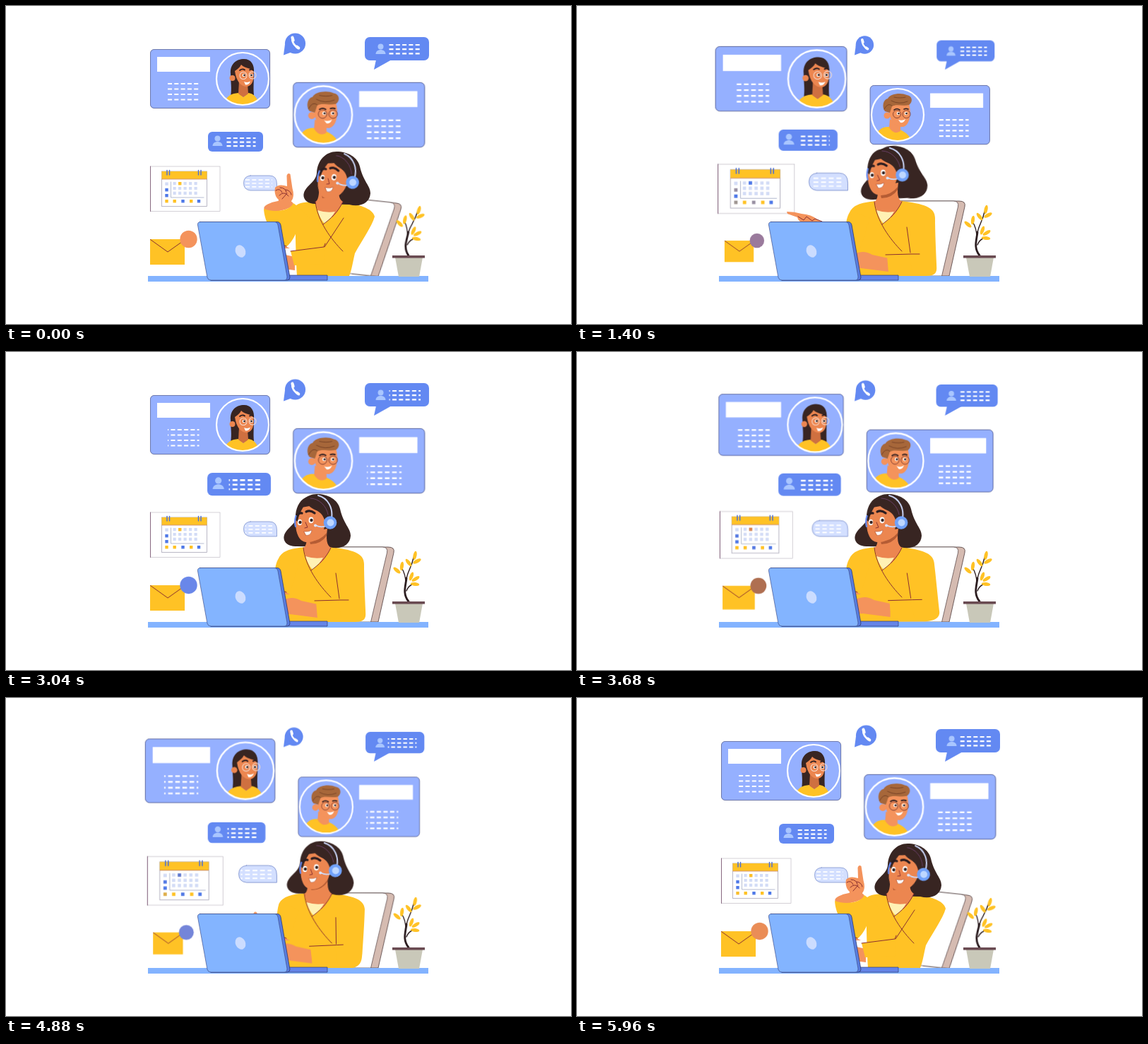
Recreate the animation shown at these times as an HTML page. Size 800x450 px, loop 6 s.

```html
<!DOCTYPE html>
<html lang="en">
<head>
<meta charset="utf-8">
<title>Online support desk</title>
<style>
html, body { margin: 0; width: 100%; height: 100%; overflow: hidden; background: #fff; }
svg { display: block; width: 100vw; height: 100vh; }
path, line { stroke-linecap: round; stroke-linejoin: round; }
.text { fill: none; stroke: #fff; stroke-width: 2.2; stroke-linecap: butt; stroke-dasharray: 6 3.3; animation: crawl 2s linear infinite; }
.ink { fill: none; stroke: #8a3030; stroke-width: 1; }
.dark { fill: none; stroke: #2c1d20; }
.sun { fill: #ffc225; }
.skin { fill: #f4935c; }
.face { fill: #ec8650; }
.hair { fill: #382522; }
.blue { fill: #6389f2; }
.card { fill: #95b0ff; stroke: #3d4780; stroke-width: .7; }
.pulse { animation: pulse 1.5s cubic-bezier(.37, 0, .63, 1) infinite alternate; }
.slow { animation-duration: 3s; }
.dot { animation: dot 1s linear infinite alternate; }
.day { animation: day 1.5s linear infinite alternate; }
.tagA { animation: tagA 6s linear infinite; }
.tagB { animation: tagB 6s linear infinite; }
.chair, .plant, .torso, .sleeve, .cuff, .fold, .front, .palm, .point, .aim, .locks, .head {
  animation: 6s ease-in-out infinite;
}
.chair { transform-origin: 520px 382px; animation-name: chair; }
.plant { transform-origin: 569px 352px; animation-name: plant; }
.torso { animation-name: torso; }
.sleeve { animation-name: sleeve; }
.cuff { animation-name: cuff; }
.fold { animation-name: fold; }
.front { animation-name: front; }
.palm { animation-name: palm; }
.point { transform-origin: 395px 275px; animation-name: point; }
.aim { animation-name: aim; }
.locks, .head { transform-origin: 440px 240px; }
.locks { animation-name: locks; }
.head { animation-name: head; }

@keyframes crawl { to { stroke-dashoffset: 9.3; } }
@keyframes pulse { from { transform: scale(var(--a, 1)); } to { transform: scale(var(--b, 1)); } }
@keyframes dot { 0% { fill: #f4935c; } 25% { fill: #b46c3e; } 62% { fill: #987ba2; } 100% { fill: #6389f2; } }
@keyframes day { 0% { fill: #ffc225; } 43% { fill: #f08a4c; } 51% { fill: #a9795c; } 80%, 100% { fill: #4f79e8; } }
@keyframes tagA { 0%, 12%, 37%, 78%, 100% { fill: #ffc225; } 23% { fill: #9c9494; } 89% { fill: #94809c; } }
@keyframes tagB { 0%, 12%, 37%, 60%, 82%, 100% { fill: #4f79e8; } 23% { fill: #9a90a0; } 71% { fill: #7d78b4; } }

@keyframes chair { 0%, 5%, 96.3%, 100% { transform: rotate(6deg); } 16.7%, 77.3% { transform: rotate(0deg); } 89.3% { transform: rotate(.8deg); } }
@keyframes plant { 0%, 5%, 96.3%, 100% { transform: rotate(5deg); } 16.7%, 77.3% { transform: rotate(0deg); } 89.3% { transform: rotate(.8deg); } }
@keyframes torso {
  0%, 5%, 96.3%, 100% { d: path("M441 277C430 277 418 277 411 282C409 300 410 345 412 382L486 382C490 372 491 362 494 350C505 330 518 312 522 298C519 286 500 281 474 277Z"); }
  16.7%, 32.9%, 41.8%, 50.7%, 59.6%, 68.4%, 77.3% { d: path("M423 276C405 278 392 280 386 292C378 305 378 330 390 382L495 382C512 382 509 372 509 365C508 340 507 320 507 300C507 284 490 280 460 276Z"); }
  37.3%, 46.2%, 55.1%, 64%, 72.9% { d: path("M423 276C405 278 392 280 386 292C378 305 378 330 390 382L475 380C500 381 526 382 521 368C514 335 510 310 503 294C498 284 480 279 460 276Z"); }
  89.3% { d: path("M428 276C405 277 392 281 388 288C390 330 400 340 403 382L480 382C481 365 486 358 490 350C500 330 509 310 511 295C508 285 490 280 463 277Z"); }
}
@keyframes sleeve {
  0%, 5%, 96.3%, 100% { d: path("M407 279C402 290 380 293 365 287C366 305 375 320 395 342C402 338 408 328 412 318L430 300L411 282Z"); }
  16.7%, 77.3% { d: path("M390 310C385 318 380 320 375 325C370 340 370 350 385 355C395 350 400 345 402 340L415 300L388 290Z"); }
  89.3% { d: path("M385 279C379 290 360 295 346 292C348 305 360 330 388 350C395 345 400 335 402 325L415 300L388 286Z"); }
}
@keyframes cuff {
  0%, 5%, 96.3%, 100% { d: path("M452 341L403 347L408 367L450 365Z"); }
  16.7%, 32.9%, 41.8%, 50.7%, 59.6%, 68.4%, 77.3% { d: path("M470 353L439 353L441 377L475 377Z"); }
  37.3%, 46.2%, 55.1%, 64%, 72.9% { d: path("M475 351L449 351L453 375L485 375Z"); }
  89.3% { d: path("M453 345L405 349L410 369L451 367Z"); }
}
@keyframes fold {
  0%, 5%, 96.3%, 100% { d: path("M403 347L450 341L452 336M478 300L451 341"); }
  16.7%, 32.9%, 41.8%, 50.7%, 59.6%, 68.4%, 77.3% { d: path("M437 352L474 351L485 351M467 313L472 349"); }
  37.3%, 46.2%, 55.1%, 64%, 72.9% { d: path("M448 351L475 350L495 349M468 313L474 347"); }
  89.3% { d: path("M406 349L450 345L453 343M467 303L453 345"); }
}
@keyframes front { 0%, 5%, 96.3%, 100% { transform: translateX(17px); } 16.7%, 77.3% { transform: translateX(0); } 89.3% { transform: translateX(6px); } }
@keyframes palm {
  0%, 5%, 89.3%, 100% { transform: translate(-32px, -2px); }
  16.7%, 32.9%, 41.8%, 50.7%, 59.6%, 68.4%, 77.3% { transform: none; }
  37.3%, 46.2%, 55.1%, 64%, 72.9% { transform: translate(8px, -3px); }
}
@keyframes point {
  0%, 5%, 96.3%, 100% { transform: translate(0, 0) rotate(0deg); }
  16.7%, 77.3% { transform: translate(-40px, 85px) rotate(-20deg); }
  89.3% { transform: translate(-25px, 3px) rotate(-9deg); }
}
@keyframes aim { 0%, 11% { transform: translate(50px, 35px); } 18.5%, 27% { transform: none; } 33%, 100% { transform: translate(50px, 35px); } }
@keyframes locks {
  0%, 5%, 96.3%, 100% { transform: translate(28px, 5px) rotate(0deg); }
  16.7%, 26% { transform: translate(7px, -3px) rotate(-4deg); }
  36%, 60% { transform: translate(0, 0) rotate(0deg); }
  71.3%, 76% { transform: translate(0, 1px) rotate(0deg); }
  89.3% { transform: translate(13px, 3px) rotate(0deg); }
}
@keyframes head {
  0%, 5%, 96.3%, 100% { transform: translate(32px, 5.5px) rotate(8deg); }
  16.7%, 26% { transform: translate(1.5px, -2px) rotate(-1deg); }
  36%, 60% { transform: translate(0, 0) rotate(0deg); }
  71.3%, 76% { transform: translate(2.5px, 1px) rotate(1deg); }
  89.3% { transform: translate(17px, 4px) rotate(5deg); }
}
</style>
</head>
<body>
<svg viewBox="0 0 800 450">
  <defs>
    <clipPath id="ring1"><circle cx="335" cy="103" r="37"/></clipPath>
    <clipPath id="ring2"><circle cx="454" cy="154" r="37"/></clipPath>
    <g id="user" fill="#a9c6ff"><circle cy="-3.5" r="4"/><path d="M-7 7C-7 -1 7 -1 7 7Z"/></g>
    <ellipse id="leaf" class="sun" rx="2.5" ry="6.3"/>
    <rect id="cell" width="4.4" height="4.4"/>
    <rect id="panel" class="card" x="-84.6" y="-41.6" width="169.2" height="83.2" rx="5.5"/>
  </defs>

  <!-- Caller cards -->
  <g class="pulse" style="--b:1.1;transform-origin:289px 103px">
    <use href="#panel" x="289" y="103"/>
    <rect x="214" y="72" width="75" height="21" fill="#fff"/>
    <path class="text" d="M229 110h44.5M229 117.5h44.5M229 125h44.5M229 132.5h44.5"/>
    <g clip-path="url(#ring1)">
      <path class="hair" d="M318 96C317 82 326 75 337 75C347 75 352 83 351 94C351 108 350 116 351 126L318 128C320 116 318 108 318 96Z"/>
      <path class="sun" d="M308 142C311 126 320 124 329 123L336 129L343 123C350 124 356 128 359 142Z"/>
      <path d="M330 106L342 110L343 124L336 129L329 124Z" fill="#cf7040"/>
      <path class="face" d="M324 92C328 89 331 87 333 83C338 88 346 88 350 91C352 104 349 113 341 114C333 114 326 107 324 92Z"/>
      <circle class="face" cx="320.500" cy="102" r="4"/>
      <path d="M337 107Q342 109 346 106.500Q344 112 339 111.500Z" fill="#fff"/>
      <path class="dark" stroke-width="1.800" d="M331 91Q335 88 338 90.500M345 90.500Q348 88.500 350 91"/>
      <g fill="#fff"><circle cx="337" cy="98" r="2.300"/><circle cx="347.500" cy="98" r="2.300"/></g>
      <circle class="hair" cx="337.500" cy="98" r="1.400"/><circle class="hair" cx="347.500" cy="98" r="1.400"/>
      <g fill="none" stroke="#f6dccf" stroke-width="1"><circle cx="336" cy="98.500" r="5"/><circle cx="349" cy="98" r="5"/></g>
    </g>
    <circle cx="335" cy="103" r="37" fill="none" stroke="#fff" stroke-width="2.2"/>
  </g>

  <g class="pulse" style="--a:1.1;transform-origin:499.7px 154px">
    <use href="#panel" x="499.7" y="154"/>
    <rect x="500" y="123.5" width="75" height="20.5" fill="#fff"/>
    <path class="text" d="M510 161h44.5M510 168.7h44.5M510 176.3h44.5M510 184h44.5"/>
    <g clip-path="url(#ring2)">
      <path class="sun" d="M420 192C424 175 432 170 443 171C458 174 470 179 474 192Z"/>
      <path class="skin" d="M443 160L458 168L458 177Q449 183 442 172Z"/>
      <path class="skin" d="M441 139L470 138C474 152 471 170 461 171C449 171 441 162 441 139Z"/>
      <circle class="skin" cx="439" cy="155" r="4.5"/>
      <path d="M436 149C431 142 434 132 440 131C443 124 459 122 467 126C475 127 476 136 470 140C460 142 452 138 446 142L443 151Z" fill="#a7673a"/>
      <path class="dark" stroke-width=".7" d="M445 134Q456 140 468 135M449 129Q458 131 465 129M435 146Q440 136 446 141" style="stroke:#6b3a22"/>
      <path class="dark" stroke-width="1.600" d="M449 147Q453 144 457 147M463 146Q466 144.500 469 146"/>
      <g fill="#fff"><circle cx="455" cy="152" r="2.300"/><circle cx="466" cy="152" r="2.300"/></g>
      <circle class="hair" cx="455.500" cy="152" r="1.400"/><circle class="hair" cx="466.500" cy="152" r="1.400"/>
      <g fill="none" stroke="#813f32" stroke-width=".9"><circle cx="453" cy="153" r="5.500"/><circle cx="466.500" cy="153" r="5.500"/></g>
      <path d="M455 161Q461 163 465 160Q463 166 458 165Z" fill="#fff"/>
    </g>
    <circle cx="454" cy="154" r="37" fill="none" stroke="#fff" stroke-width="2.2"/>
  </g>

  <!-- Bubbles -->
  <g class="pulse" style="--b:.87;transform-origin:393px 69px">
    <path class="blue" d="M395 54L393 69.5L405 65Z"/><circle class="blue" cx="409.5" cy="53" r="14.6"/>
    <path d="M405 45Q405 54 413 59" fill="none" stroke="#fff" stroke-width="2.6"/>
    <path d="M405.5 44.5l1.2 4M411.5 57.5l2.8 2" stroke="#fff" stroke-width="4"/>
  </g>
  <g class="pulse" style="--b:.9;transform-origin:521px 90px">
    <rect class="blue" x="508" y="44" width="91" height="33" rx="7"/><path class="blue" d="M524 76L521 90L546 76Z"/>
    <use href="#user" x="530.5" y="61"/>
    <path class="text" d="M542.5 55h44.5M542.5 61.2h44.5M542.5 67.4h44.5"/>
  </g>
  <g class="pulse slow" style="--b:1.153;transform-origin:292px 224px">
    <rect class="blue" x="286" y="178" width="78" height="28" rx="6"/>
    <use href="#user" x="299.5" y="191"/>
    <path class="text" d="M312.5 187h41M312.5 192.6h41M312.5 198.2h41"/>
  </g>
  <g class="pulse" style="--b:1.17;transform-origin:384px 261px">
    <path d="M346 240H373Q383.5 240 383.5 252V261H346Q336.5 260 336.5 250.5Q336.5 241 346 240Z" fill="#d3dfff" stroke="#7287c8" stroke-width=".7"/>
    <path class="text" style="stroke-width:1.7" d="M339 246.2h38M339 251h38M339 255.8h38"/>
  </g>

  <!-- Calendar -->
  <g class="pulse" style="--b:1.1;transform-origin:253.5px 259px">
    <rect x="204.5" y="227" width="98.5" height="63.5" fill="#fff" stroke="#b8b2bc" stroke-width=".6"/>
    <path d="M204.5 227V290.5" stroke="#75506d" stroke-width=".8"/>
    <rect x="220.5" y="234" width="64" height="49.5" fill="#fff" stroke="#aaa7b8" stroke-width=".8"/>
    <rect class="sun" x="220.5" y="234" width="64" height="10.8"/>
    <path d="M221 245H284" stroke="#c06c3a" stroke-width=".7"/>
    <path d="M228 232.5v6.5M231.5 232.5v6.5M272.5 232.5v6.5M276 232.5v6.5" stroke="#4f70d0" stroke-width="1.5"/>
    <path d="M233.5 249V271H280" fill="none" stroke="#98a3bf" stroke-width=".7"/>
    <path d="M236.5 251.2h35M236.5 258h35M236.5 264.8h35" stroke="#d3dcf6" stroke-width="4.2" stroke-dasharray="4.2 3.3" style="stroke-linecap:butt"/>
    <use href="#cell" class="day" x="244" y="249"/>
    <use href="#cell" x="225.3" y="249.5" fill="#d3dcf6"/>
    <use href="#cell" class="tagB" x="225.3" y="258"/>
    <use href="#cell" x="225.3" y="266" fill="#4f79e8"/>
    <use href="#cell" class="tagA" x="225.3" y="274"/>
    <use href="#cell" class="sun" x="236.5" y="274"/>
    <use href="#cell" class="tagB" x="248.3" y="274"/>
    <use href="#cell" class="sun" x="260" y="274"/>
    <use href="#cell" x="270.8" y="274" fill="#4f79e8"/>
  </g>

  <!-- Envelope -->
  <g class="pulse" style="--b:.84;transform-origin:235px 342.5px">
    <rect class="sun" x="204" y="330" width="49" height="36"/>
    <path class="ink" d="M204.5 330.5L229 348L253 331"/>
    <circle class="dot" cx="258.5" cy="330" r="12.2"/>
  </g>

  <!-- Chair -->
  <g class="chair">
    <path d="M440 276H541Q551 276 549 284L527 382H490Z" fill="#d5bbb1" stroke="#4d3a3c" stroke-width=".8"/>
    <path d="M430 276H533Q541 276 539.5 284L516.5 382H440Z" fill="#fff" stroke="#4d3a3c" stroke-width=".7"/>
  </g>

  <!-- Agent -->
  <path class="torso sun"/>
  <g class="locks">
    <path class="hair" d="M440 201C456 201 470 209 473 222C478 244 488 249 488 260C487 274 474 280 458 276L412 275C399 276 391 268 394 259C398 248 411 244 412 231C413 213 425 201 440 201Z"/>
  </g>
  <g class="front">
    <path class="face" d="M426 255L455 250C453 265 454 273 460 277Q452 293 445 299L425 291L421 277Q427 274 426 255Z"/>
    <path d="M430 268Q444 268 454 256V260Q446 272 431 272Z" fill="#b55c34"/>
    <path d="M424 289Q436 293 449 291Q443 301 434 308Q427 300 424 289Z" fill="#fff1b4"/>
    <path class="ink" d="M421 277C424 304 443 330 460 347M460 277C453 292 443 301 432 309"/>
  </g>
  <path class="palm skin" d="M386 354C398 347 408 346 418 352L441 357V376L402 371L386 372Z"/>
  <path class="cuff sun"/>
  <path class="fold ink"/>
  <g class="point">
    <ellipse class="skin" cx="386" cy="283" rx="21" ry="7" transform="rotate(-9 386 283)"/>
    <path class="skin" d="M384 286L386 274Q379 268 381 257Q386 251 398 255L397.5 240Q399 235 402.5 238L405.5 258Q409 270 404 276L406 284Z"/>
    <path class="ink" d="M382 261Q388 257 391 264M388 257Q396 257 397 264M387 268Q394 261 400 269M396 260Q403 261 404 267M391 273L398 265"/>
  </g>
  <path class="sleeve sun"/>
  <g class="aim">
    <path class="skin" d="M297 291Q308 291 318 294Q332 295 340 302L352 308H322Q313 305 312 299L298 294Z"/>
    <path class="ink" d="M313 298L321 303L325 298L333 304L337 301L347 305"/>
  </g>
  <g class="head">
    <path class="face" d="M413 221C409 238 409 251 414 261C419 271 430 271 438 266C448 260 454 247 452 231L441 216Z"/>
    <path class="hair" d="M410 238C409 224 414 211 424 206C444 199 462 211 464 237L456 250C451 240 451 229 439 224C430 220 427 216 424 212C421 222 415 226 413 240Z"/>
    <path d="M431 207C443 207 454 218 456 230" fill="none" stroke="#7b4a80" stroke-width=".7"/>
    <path class="dark" stroke-width="3.2" d="M412.5 231Q415 227 419 228M425 226Q431 223 437 228"/>
    <g fill="#fff"><ellipse cx="416" cy="241" rx="3.1" ry="4.2"/><ellipse cx="432" cy="238" rx="3.4" ry="4.4"/></g>
    <circle class="hair" cx="416.5" cy="241" r="2.2"/><circle class="hair" cx="432.5" cy="238" r="2.2"/>
    <path class="ink" stroke-width="1.3" d="M424 241L427 248L423 249"/>
    <path d="M422 254Q428 255 433 252Q432 260 425 259.5Z" fill="#fff" stroke="#a34932" stroke-width=".5"/>
    <path d="M442 203C457 207 463 222 461 235" fill="none" stroke="#c9d4f6" stroke-width="2"/>
    <path d="M410.5 232Q408 240 410 247" fill="none" stroke="#6389f2" stroke-width="2.2"/>
    <path d="M454 246Q446 249 439 245.5" fill="none" stroke="#cbdcff" stroke-width="1.6"/>
    <circle cx="438" cy="245.5" r="2" fill="#dce6ff"/>
    <circle cx="459" cy="241.5" r="9.3" fill="#70a1fa"/><circle cx="459.5" cy="241.5" r="5" fill="#bed7ff"/>
  </g>

  <!-- Desk, laptop -->
  <rect x="201" y="382" width="397" height="8" fill="#83b3ff"/>
  <path d="M290 381H455V388H290Z" fill="#6484e8" stroke="#303a70" stroke-width=".7"/>
  <path d="M275 305.5H384Q388 305.5 389 310L402 384Q402 388 398 388H290Z" fill="#587de0" stroke="#303a70" stroke-width=".8"/>
  <path d="M275 305.5H380Q384 305.5 385 310L398 383Q398 388 394 388H290Q286 388 285 384L271.5 310Q271 305.5 275 305.5Z" fill="#83b4ff" stroke="#404f8c" stroke-width=".7"/>
  <ellipse cx="332" cy="347" rx="7" ry="9" fill="#cbdcff" transform="rotate(-25 332 347)"/>

  <!-- Plant -->
  <g class="plant">
    <path class="dark" stroke-width="2.8" d="M570 353C561 342 566 331 567 320"/>
    <path class="dark" stroke-width="1.4" d="M567 322C568 311 574 306 577 291M566 327C566 317 563 310 560 305M567 338Q570 330 579 327"/>
    <use href="#leaf" transform="translate(579 288) rotate(12)"/>
    <use href="#leaf" transform="translate(570 298) rotate(-38)"/>
    <use href="#leaf" transform="translate(582 296) rotate(62)"/>
    <use href="#leaf" transform="translate(560.5 303) rotate(8)"/>
    <use href="#leaf" transform="translate(553.5 309) rotate(-50)"/>
    <use href="#leaf" transform="translate(574 317.5) rotate(20)"/>
    <use href="#leaf" transform="translate(580 321) rotate(58)"/>
    <use href="#leaf" transform="translate(579 328.5) rotate(96)"/>
  </g>
  <path d="M551 356H590L585 383H556Z" fill="#c9c8b9"/>
  <rect x="547" y="353" width="46" height="3.6" fill="#6a4b52"/>
</svg>
</body>
</html>
```
